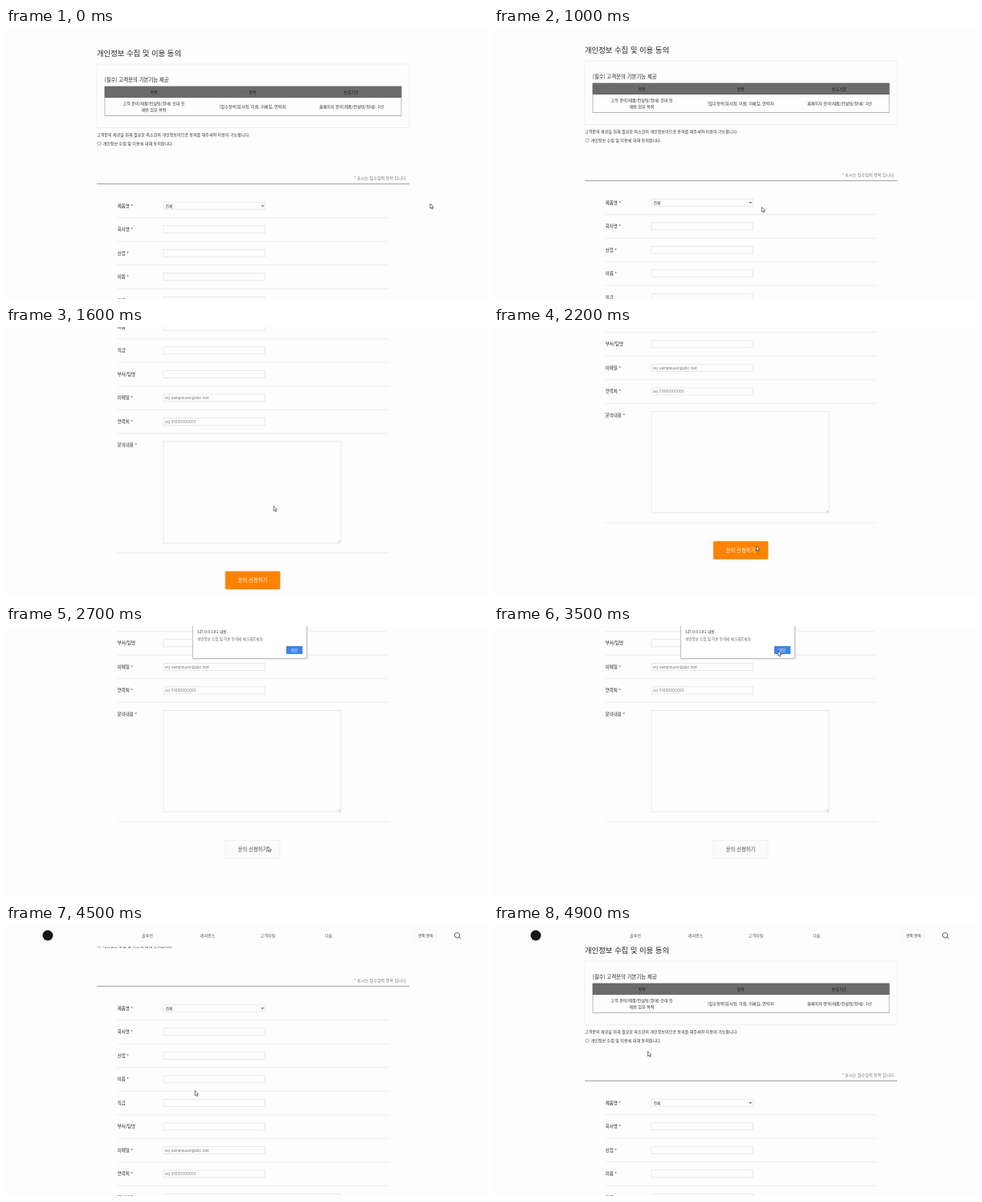
Recreate the animation shown at these times as an HTML page. Size 600 px wide and 338 px high, loop 5000 ms.

```html
<!DOCTYPE html>
<html lang="ko">
<head>
<meta charset="utf-8">
<title>문의 양식</title>
<style>
  html, body { margin: 0; width: 100%; height: 100%; overflow: hidden; background: #fdfdfd; }
  svg { display: block; width: 100vw; height: 100vh; }
  text { font-family: "Noto Sans CJK KR", "Noto Sans CJK", "Noto Sans", sans-serif; }
  .latin { font-family: Inter, sans-serif; }
</style>
</head>
<body>
<svg id="stage" viewBox="0 0 600 338">
  <g id="page"></g>
  <g id="header"></g>
  <g id="dialog"></g>
  <path id="cursor" d="M0 0V6.1L1.4 4.9L2.4 7.1L3.5 6.6L2.5 4.5H4.3Z" fill="#fff" stroke="#333" stroke-width=".65"/>
</svg>
<script>
const LOOP = 5000, STEP = 100;
const $ = id => document.getElementById(id);
const [page, header, dialog, cursor] = ["page", "header", "dialog", "cursor"].map($);

function add(parent, tag, attrs, content = "") {
  const el = document.createElementNS("http://www.w3.org/2000/svg", tag);
  for (const key in attrs) el.setAttribute(key, attrs[key]);
  el.textContent = content;
  return parent.appendChild(el);
}

// y is the vertical middle of the glyphs
const label = (parent, x, y, size, content, attrs = {}) =>
  add(parent, "text", { x, y: y + size * 0.37, "font-size": size, fill: "#333", ...attrs }, content);
const box = (parent, x, y, width, height, attrs = {}) =>
  add(parent, "rect", { x, y, width, height, fill: "none", stroke: "#e2e2e2", "stroke-width": 0.7, ...attrs });
const rule = (x1, x2, y, stroke, width) =>
  add(page, "path", { d: `M${x1} ${y}H${x2}`, stroke, "stroke-width": width });
const middle = { "text-anchor": "middle" };

// Consent section
label(page, 113, 31.5, 9.35, "개인정보 수집 및 이용 동의", { fill: "#222", "font-weight": 500 });
box(page, 113, 45, 389, 79.5, { stroke: "#ececec" });
label(page, 122.5, 65, 6.4, "[필수] 고객문의 기본기능 제공", { fill: "#222", "font-weight": 500 });
box(page, 123, 73, 369, 36.5, { stroke: "#999" });
box(page, 122.7, 72.7, 369.6, 14.3, { fill: "#6b6b6b", stroke: "none" });
[[184, "목적"], [307, "항목"], [429.5, "보유기간"]].forEach(([x, name]) =>
  label(page, x, 80, 5, name, { ...middle, fill: "#1c1c1c", "font-weight": 500 }));
[[184, 94.5, "고객 문의(제품/컨설팅/장애) 응대 등"], [184, 102.3, "제반 업무 목적"],
 [307, 98.3, "[필수항목]회사명, 이름, 이메일, 연락처"], [430, 98.3, "홈페이지 문의(제품/컨설팅/장애): 3년"]]
  .forEach(([x, y, line]) => label(page, x, y, 5.1, line, middle));
label(page, 113, 133, 5.05, "고객문의 제공을 위해 필요한 최소한의 개인정보이므로 동의를 해주셔야 이용이 가능합니다.");
box(page, 114.2, 142.2, 3.8, 3.8, { fill: "#fff", stroke: "#777", "stroke-width": 0.6, rx: 0.5 });
label(page, 120.5, 144.2, 5.07, "개인정보 수집 및 이용에 대해 동의합니다.");
label(page, 499, 187, 5.1, "* 표시는 필수입력 항목 입니다.", { "text-anchor": "end", fill: "#777" });
rule(113, 502, 194.4, "#888", 0.8);

// Form rows
const hints = { "이메일 *": "ex) sampleuser@abc.test", "연락처 *": "ex) 01000000000" };
["제품명 *", "회사명 *", "산업 *", "이름 *", "직급", "부서/팀명", "이메일 *", "연락처 *", "문의내용 *"]
  .forEach((name, i, all) => {
    const y = 221.6 + i * 29.53, last = i === all.length - 1;
    label(page, 138.7, y, 5.5, name, { fill: "#222", "font-weight": 500 });
    box(page, 196, y - 4.4, last ? 221 : 126.5, last ? 126.4 : 9);
    rule(138, 476.5, last ? 592.2 : y + 15, "#e8e8e8", 0.7);
    if (hints[name]) label(page, 197.7, y + 0.2, 4.6, hints[name], { class: "latin", fill: "#777" });
  });
label(page, 198.8, 222, 4.5, "전체");
add(page, "path", { d: "M317.9 221l1.4 1.5l1.4-1.5", fill: "none", stroke: "#222", "stroke-width": 0.9 });
add(page, "path", { d: "M413.6 579l2.6-2.6m-1 2.6l1-1", stroke: "#888", "stroke-width": 0.5 });
const submit = box(page, 273.2, 615.4, 67.8, 22, { rx: 0.8 });
const submitText = label(page, 307, 626.6, 6.27, "문의 신청하기", middle);

// Site header
box(header, 0, 0, 600, 27, { fill: "#fdfdfd", stroke: "none" });
add(header, "circle", { cx: 52, cy: 13, r: 6.5, fill: "#151515" });
[[176, "솔루션"], [251, "레퍼런스"], [326, "고객지원"], [401.5, "다율"]]
  .forEach(([x, name]) => label(header, x, 13.5, 5, name, { ...middle, fill: "#555" }));
box(header, 507.5, 6.8, 29.5, 13.2, { rx: 1, stroke: "#eee" });
label(header, 522.3, 13.5, 4.75, "견적 문의", middle);
add(header, "path", { d: "M564.2 15.3l2 2M558.4 12.8a3.2 3.2 0 1 0 6.4 0a3.2 3.2 0 1 0-6.4 0", fill: "none", stroke: "#333", "stroke-width": 0.8 });

// Browser alert
box(dialog, 231.7, -3, 144, 44.7, { rx: 1.5, fill: "#000", "fill-opacity": 0.1, stroke: "none" });
box(dialog, 232.4, -3, 142.2, 43.5, { rx: 1, fill: "#fff", stroke: "#aaa" });
label(dialog, 238, 7.7, 4.75, "127.0.0.1:81 내용:");
label(dialog, 238, 16.3, 4.55, "개인정보 수집 및 이용 동의에 체크해주세요.", { fill: "#666" });
box(dialog, 348.8, 25, 20.4, 10, { rx: 0.8, fill: "#3f86e4", stroke: "none" });
label(dialog, 359, 30, 4.3, "확인", { ...middle, fill: "#fff" });

// Motion: [time, value...]
const scrollTrack = [
  [900, 0], [1000, 4], [1100, 62], [1300, 212], [1400, 285], [1500, 310], [1600, 310.5],
  [1900, 334], [2100, 344], [2200, 348], [3900, 348], [4000, 336], [4500, 118],
  [4700, 38], [4800, 10], [4900, 0]
];
const cursorTrack = [
  [0, 528, 219], [100, 526, 227], [200, 480, 150], [300, 370, 60], [400, 270, 29], [500, 195, 55],
  [600, 171, 100], [700, 144, 150], [800, 395, 245], [900, 395, 245], [1000, 333.2, 223.3],
  [1700, 333.2, 223.3], [2200, 326.5, 273], [2700, 326, 275], [2800, 327, 262], [3200, 364, 27],
  [3400, 353.5, 31], [3600, 353.5, 31], [3900, 235.2, 206.5], [4500, 235.2, 206.5], [4900, 191.5, 157.5]
];

function sample(track, t) {
  const i = track.findIndex(key => key[0] > t);
  if (i === 0) return track[0].slice(1);
  if (i < 0) return track[track.length - 1].slice(1);
  const a = track[i - 1], b = track[i], k = (t - a[0]) / (b[0] - a[0]);
  return a.slice(1).map((v, n) => v + (b[n + 1] - v) * k);
}

const during = (t, from, to) => t >= from && t < to;
const show = (el, on) => el.setAttribute("visibility", on ? "visible" : "hidden");

function draw(t) {
  const [scroll] = sample(scrollTrack, t);
  const [x, y] = sample(cursorTrack, t);
  const hover = during(t, 2300, 3600);
  page.setAttribute("transform", `translate(0 ${-scroll})`);
  cursor.setAttribute("transform", `translate(${x} ${y})`);
  submit.setAttribute("fill", hover ? "#fbfbfb" : "#ff8203");
  submit.setAttribute("stroke", hover ? "#ebebeb" : "#f58a1c");
  submitText.setAttribute("fill", hover ? "#444" : "#fff");
  show(header, t >= 4000);
  show(dialog, during(t, 2500, 3600));
}

const start = performance.now();
function tick() {
  const t = (performance.now() - start) % LOOP;
  draw(Math.floor(t / STEP) * STEP);
  requestAnimationFrame(tick);
}
tick();
</script>
</body>
</html>
```
